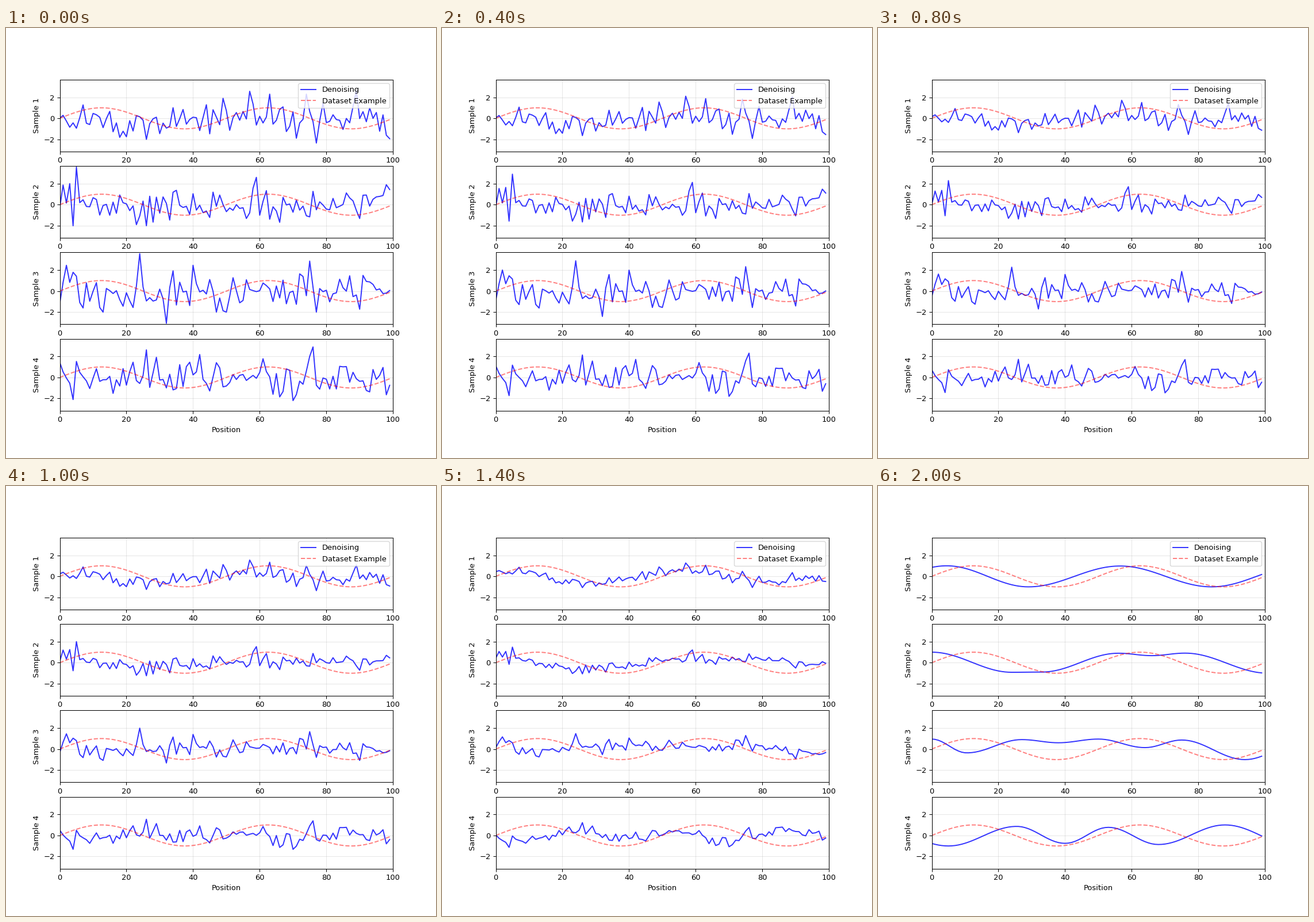
Animation, 748 px wide and 748 px high, one loop 2200 ms. Source, as a matplotlib script:

```python
import numpy as np
import matplotlib.pyplot as plt
from matplotlib.animation import FuncAnimation

FRAMES = 11
INTERVAL = 200
POS = np.arange(100)

# Turning points (position, height) of the smooth curve each sample ends on.
TURNS = [
    [(-21, -1), (4.5, 1), (29, -1), (56.5, .98), (84, -1), (111, 1)],
    [(0, 1), (24, -.91), (33, -.89), (56, .9), (66, .67), (76, .91),
     (101, -1)],
    [(0, .95), (10.5, -.36), (27, .9), (38, .6), (50, .95), (64, .14),
     (75, .86), (94, -1), (112, .8)],
    [(-16, .8), (5, -1), (25.5, .86), (40, -.75), (53, .77), (68, -.86),
     (88, 1), (110, -1.1)],
]

# The few spikes that stand out of the noise.
SPIKES = [
    {57: 2.57, 63: 2.3, 74: 2.3, 77: -2.35, 89: 2.6},
    {1: 1.87, 4: -2.0, 5: 3.58, 59: 2.6, 98: 1.9},
    {2: 2.45, 24: 3.55, 32: -3.06, 40: 2.45, 75: 2.85},
    {4: -2.1, 26: 2.62, 42: 2.18, 70: -2.2, 76: 2.9},
]


def ease_through(turns):
    """Join turning points with half cosine waves, sampled at POS."""
    xs, ys = np.array(turns, float).T
    phase = np.interp(POS, xs, np.arange(len(xs)))
    i = phase.astype(int)
    blend = (1 - np.cos(np.pi * (phase - i))) / 2
    return ys[i] + (ys[i + 1] - ys[i]) * blend


def make_noise(rng, spikes):
    noise = np.clip(rng.normal(0, 0.95, len(POS)), -2, 2)
    for i, height in spikes.items():
        noise[i] = height
    return noise


rng = np.random.default_rng(7)
clean = [ease_through(turns) for turns in TURNS]
noise = [make_noise(rng, spikes) for spikes in SPIKES]

fig, axes = plt.subplots(4, 1, figsize=(8, 8), dpi=93.5)
wave = np.sin(4 * np.pi * POS / 100)
lines = []
for n, ax in enumerate(axes):
    line, = ax.plot(POS, noise[n], "b-", alpha=0.8, label="Denoising")
    ax.plot(POS, wave, "r--", alpha=0.5, label="Dataset Example")
    ax.set_xlim(0, 100)
    ax.set_ylim(-3.16, 3.68)
    ax.set_ylabel(f"Sample {n + 1}")
    ax.grid(True, alpha=0.3)
    lines.append(line)
axes[0].legend(loc="upper right")
axes[-1].set_xlabel("Position")


def update(frame):
    # Noise fades evenly while the signal emerges late.
    t = frame / (FRAMES - 1)
    for line, start, end in zip(lines, noise, clean):
        line.set_ydata((1 - t) * start + t ** 1.9 * end)
    return lines


anim = FuncAnimation(fig, update, frames=FRAMES, interval=INTERVAL,
                     init_func=lambda: update(0), repeat=True, repeat_delay=0)
plt.show()
```
